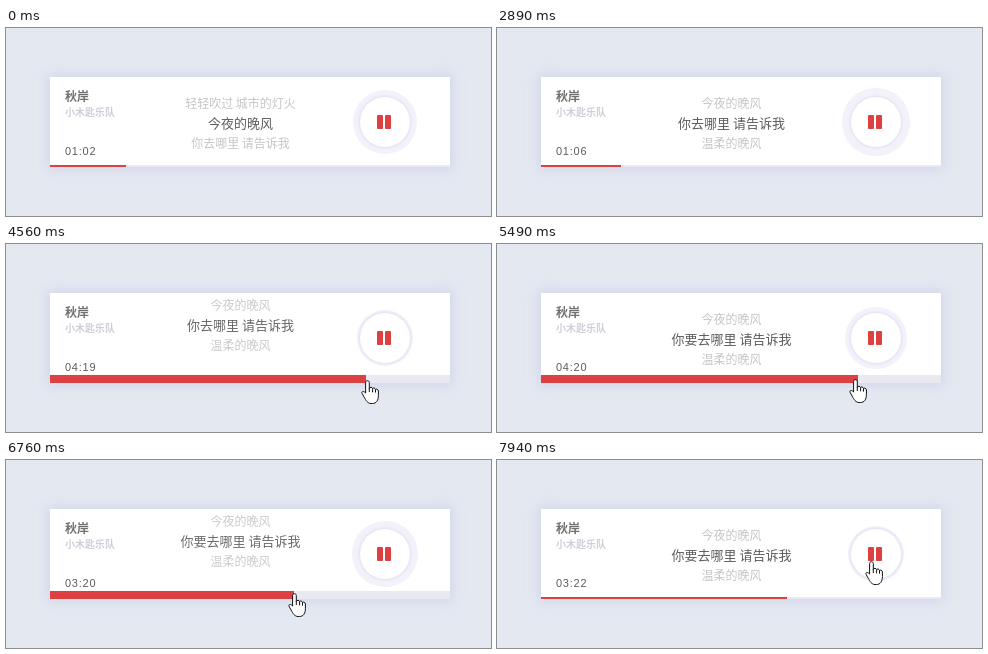
Write an HTML page that moves like this. It is 485 px wide and 188 px high and loops after 8 s.

```html
<!DOCTYPE html>
<html lang="zh-CN">
<head>
<meta charset="utf-8">
<title>Player</title>
<style>
html, body { margin: 0; width: 100%; height: 100%; overflow: hidden; }
body { position: relative; background: #e4e8f1; font-family: "Noto Sans CJK SC", "Noto Sans CJK", sans-serif; }
div, svg { position: absolute; white-space: nowrap; }
#card { left: 44px; top: 49px; width: 400px; height: 90px; background: #fff; box-shadow: 0 0 11px 2px rgba(192, 199, 230, .55); }
#title { left: 15px; top: 8.5px; font-size: 12px; line-height: 20px; font-weight: 700; color: #707070; }
#artist { left: 15px; top: 26px; font-size: 10px; line-height: 18px; font-weight: 700; color: #d0cfd9; }
#time { left: 15px; top: 67px; font: 11px/15px "Liberation Sans", Arial, sans-serif; letter-spacing: .75px; color: #5c5c5c; }
#lyrics { left: 90px; top: 16px; width: 201px; text-align: center; }
#lyrics div { position: static; height: 20px; line-height: 20px; font-size: 12px; color: #c6c6c6; }
#lyrics .now { font-size: 13px; font-weight: 500; color: #5c5c5c; }
#pulse { border-radius: 50%; background: #f3f2fb; }
#button { left: 310px; top: 20px; width: 50px; height: 50px; border-radius: 50%; background: #fff; box-shadow: 0 0 2px 1.5px #e6e4f3; }
#button div { top: 18px; width: 6px; height: 14px; border-radius: 1px; background: #dc4040; }
#track { left: 0; bottom: 0; width: 400px; background: #e8e9f1; }
#fill { left: 0; top: 0; height: 100%; background: #dc4040; }
#pointer { left: 0; top: 0; overflow: visible; stroke-linejoin: round; }
</style>
</head>
<body>
<div id="card">
  <div id="title">秋岸</div>
  <div id="artist">小木匙乐队</div>
  <div id="time"></div>
  <div id="lyrics"><div></div><div class="now"></div><div></div></div>
  <div id="pulse"></div>
  <div id="button"><div style="left:17px"></div><div style="left:25px"></div></div>
  <div id="track"><div id="fill"></div></div>
</div>
<svg id="pointer" width="18" height="24">
  <g id="hand" fill="#fff" stroke="#111">
    <path d="M6.4 .7C7.6 .7 8.3 1.5 8.3 2.6V8.4C8.5 7 11.4 6.9 11.6 8.5 12 7.6 14.3 7.9 14.5 9.5 15.2 8.7 17.2 9.1 17.4 11V15.5C17.4 20.3 15.4 23.5 11.5 23.5H10C6.6 23.5 4.8 20.2 3.2 17.2L1 13.2C.3 11.7 2.2 10.4 4.6 13V2.6C4.6 1.5 5.3 .7 6.4 .7Z"/>
    <path fill="none" d="M8.3 8V12M11.6 8.5V12.3M14.5 9.5V12.6"/>
  </g>
  <path id="arrow" fill="#111" stroke="#fff" d="M5 0V15.5L8.6 12.2 11 17.6 13.4 16.5 11.1 11.3H16Z"/>
</svg>
<script>
const LOOP = 8000, SONG = 328, WIDTH = 400;
const $ = id => document.getElementById(id);
const clamp = p => Math.min(1, Math.max(0, p));
const span = (t, start, length) => clamp((t - start) / length);
const easeOut = p => 1 - (1 - p) ** 2.2;
const easeInOut = p => p * p * (3 - 2 * p);
const two = n => String(n).padStart(2, "0");

// [start, song second]
const ticks = [[0, 62], [90, 63], [1000, 64], [1950, 65], [2890, 66], [3800, 67],
  [4330, 259], [5200, 260], [6140, 261], [6280, 200], [6960, 201], [7850, 202]];

const verses = [
  ["轻轻吹过 城市的灯火", "今夜的晚风", "你去哪里 请告诉我"],
  ["今夜的晚风", "你去哪里 请告诉我", "温柔的晚风"],
  ["今夜的晚风", "你要去哪里 请告诉我", "温柔的晚风"]
];
// A verse leaves upwards, then the next one rises into place
const swaps = [
  { out: 90, outTime: 300, in: 390, inTime: 300, verse: 1 },
  { out: 4440, outTime: 300, in: 4920, inTime: 330, verse: 2 },
  { out: 6670, outTime: 210, in: 6880, inTime: 180, verse: 2 }
];

// [start, end, x, y]: glide to a place
const moves = [[2890, 3660, 355, 136], [4920, 5200, 352, 135],
  [5490, 5890, 282, 133], [7130, 7510, 368, 101]];

const lines = [...$("lyrics").children];

function drawSong(t) {
  const i = ticks.findLastIndex(k => k[0] <= t);
  const [start, now] = ticks[i];
  const before = i ? ticks[i - 1][1] : now;
  const seek = Math.abs(now - before) > 1 ? easeOut(span(t, start, 200)) : 1;
  $("time").textContent = two(Math.floor(now / 60)) + ":" + two(now % 60);
  $("fill").style.width = (before + (now - before) * seek) / SONG * WIDTH + "px";
  const grow = easeOut(span(t, 3560, 310)) - easeOut(span(t, 7200, 450));
  $("track").style.height = 2 + 6 * grow + "px";
}

function drawLyrics(t) {
  let verse = 0, shift = 0, alpha = 1;
  for (const s of swaps) {
    if (t < s.out) break;
    if (t < s.in) {
      const p = easeOut(span(t, s.out, s.outTime));
      shift = -20 * p;
      alpha = 1 - p ** 7;
    } else {
      const p = easeOut(span(t, s.in, s.inTime));
      verse = s.verse;
      shift = 20 * (1 - p);
      alpha = p;
    }
  }
  lines.forEach((line, i) => line.textContent = verses[verse][i]);
  $("lyrics").style.transform = `translateY(${shift}px)`;
  $("lyrics").style.opacity = alpha;
}

function drawPulse(t) {
  const r = 31 - 2.7 * Math.cos((t - 4560) / 3470 * 2 * Math.PI);
  Object.assign($("pulse").style, {
    left: 335 - r + "px", top: 45 - r + "px", width: 2 * r + "px", height: 2 * r + "px"
  });
}

function drawPointer(t) {
  let x = 485, y = 146;
  for (const [start, end, toX, toY] of moves) {
    const p = easeInOut(span(t, start, end - start));
    x += (toX - x) * p;
    y += (toY - y) * p;
  }
  const onBar = y >= 131 && y <= 139 && x < 439;
  const onButton = Math.hypot(x + 5 - 379, y - 94) < 25;
  const hand = onBar || onButton;
  $("hand").style.display = hand ? "" : "none";
  $("arrow").style.display = hand ? "none" : "";
  $("pointer").style.display = t < 2890 ? "none" : "";
  $("pointer").style.transform = `translate(${x}px, ${y}px)`;
}

function draw() {
  const t = performance.now() % LOOP;
  drawSong(t);
  drawLyrics(t);
  drawPulse(t);
  drawPointer(t);
  requestAnimationFrame(draw);
}
draw();
</script>
</body>
</html>
```
